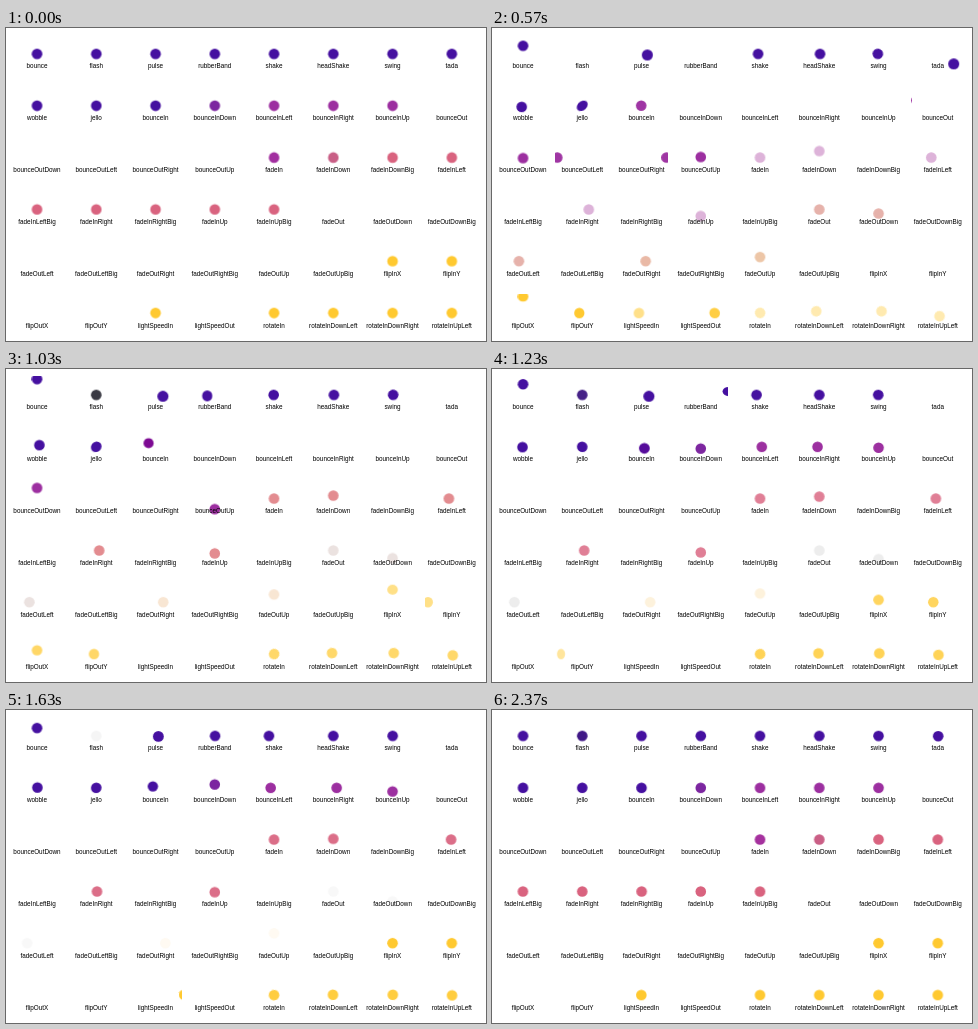
An HTML page that plays this animation: 480 px wide and 313 px high, repeating every 2.41 s.

```html
<!DOCTYPE html>
<html lang="en">
<head>
<meta charset="utf-8">
<title>Animation names</title>
<style>
html, body { margin: 0; width: 100%; height: 100%; overflow: hidden; background: #fff; }
svg { display: block; width: 480px; height: 313px; }
text { font: 12px Arial, "Liberation Sans", sans-serif; text-anchor: middle; fill: #000; }
circle { transform-box: view-box; transform-origin: 0 0; }
.live { animation: live 2410ms step-end infinite; }
.rest { animation: rest 2410ms step-end infinite; }
@keyframes live { 0% { opacity: 0 } 1.24% { opacity: 1 } 99.6%, to { opacity: 0 } }
@keyframes rest { 0% { opacity: 1 } 1.24% { opacity: 0 } 99.6%, to { opacity: 1 } }

/* attention */
@keyframes bounce {
  from, 20%, 53%, 80%, to { animation-timing-function: cubic-bezier(.215, .61, .355, 1); transform: translateY(0) }
  40%, 43% { animation-timing-function: cubic-bezier(.755, .05, .855, .06); transform: translateY(-30px) }
  70% { animation-timing-function: cubic-bezier(.755, .05, .855, .06); transform: translateY(-15px) }
  90% { transform: translateY(-4px) }
}
@keyframes flash { from, 50%, to { opacity: 1 } 25%, 75% { opacity: 0 } }
@keyframes pulse { from, to { transform: scale(1) } 50% { transform: scale(1.05) } }
@keyframes rubberBand {
  from, to { transform: scale(1, 1) }
  30% { transform: scale(1.25, .75) }
  40% { transform: scale(.75, 1.25) }
  50% { transform: scale(1.15, .85) }
  65% { transform: scale(.95, 1.05) }
  75% { transform: scale(1.05, .95) }
}
@keyframes shake {
  from, to { transform: translateX(0) }
  10%, 30%, 50%, 70%, 90% { transform: translateX(-10px) }
  20%, 40%, 60%, 80% { transform: translateX(10px) }
}
@keyframes headShake {
  0%, 50%, to { transform: translateX(0) rotateY(0deg) }
  6.5% { transform: translateX(-6px) rotateY(-9deg) }
  18.5% { transform: translateX(5px) rotateY(7deg) }
  31.5% { transform: translateX(-3px) rotateY(-5deg) }
  43.5% { transform: translateX(2px) rotateY(3deg) }
}
@keyframes swing {
  from, to { transform: rotate(0deg) }
  20% { transform: rotate(15deg) }
  40% { transform: rotate(-10deg) }
  60% { transform: rotate(5deg) }
  80% { transform: rotate(-5deg) }
}
@keyframes tada {
  from, to { transform: scale(1) rotate(0deg) }
  10%, 20% { transform: scale(.9) rotate(-3deg) }
  30%, 50%, 70%, 90% { transform: scale(1.1) rotate(3deg) }
  40%, 60%, 80% { transform: scale(1.1) rotate(-3deg) }
}
@keyframes wobble {
  from, to { transform: translateX(0) rotate(0deg) }
  15% { transform: translateX(-5px) rotate(-5deg) }
  30% { transform: translateX(4px) rotate(3deg) }
  45% { transform: translateX(-3px) rotate(-3deg) }
  60% { transform: translateX(2px) rotate(2deg) }
  75% { transform: translateX(-1px) rotate(-1deg) }
}
@keyframes jello {
  from, 11.1%, to { transform: skewX(0deg) skewY(0deg) }
  22.2% { transform: skewX(-12.5deg) skewY(-12.5deg) }
  33.3% { transform: skewX(6.25deg) skewY(6.25deg) }
  44.4% { transform: skewX(-3.125deg) skewY(-3.125deg) }
  55.5% { transform: skewX(1.5625deg) skewY(1.5625deg) }
  66.6% { transform: skewX(-.78deg) skewY(-.78deg) }
  77.7% { transform: skewX(.39deg) skewY(.39deg) }
  88.8% { transform: skewX(-.2deg) skewY(-.2deg) }
}

/* bouncing; --x and --y give the side */
@keyframes bounceIn {
  0% { opacity: 0; transform: scale(.3) }
  20% { transform: scale(1.1) }
  40% { transform: scale(.9) }
  60% { opacity: 1; transform: scale(1.03) }
  80% { transform: scale(.97) }
  to { opacity: 1; transform: scale(1) }
}
@keyframes bounceInFrom {
  0% { opacity: 0; transform: translate(calc(var(--x) * 3000px), calc(var(--y) * 3000px)) }
  60% { opacity: 1; transform: translate(calc(var(--x) * -25px), calc(var(--y) * var(--over, -25px))) }
  75% { transform: translate(calc(var(--x) * 10px), calc(var(--y) * 10px)) }
  90% { transform: translate(calc(var(--x) * -5px), calc(var(--y) * -5px)) }
  to { opacity: 1; transform: translate(0, 0) }
}
@keyframes bounceOut {
  0% { opacity: 1; transform: scale(1) }
  20% { transform: scale(.9) }
  50%, 55% { opacity: 1; transform: scale(1.1) }
  to { opacity: 0; transform: scale(.3) }
}
@keyframes bounceOutY {
  0% { opacity: 1; transform: translateY(0) }
  20% { transform: translateY(calc(var(--y) * 10px)) }
  40%, 45% { opacity: 1; transform: translateY(calc(var(--y) * -20px)) }
  to { opacity: 0; transform: translateY(calc(var(--y) * 2000px)) }
}
@keyframes bounceOutX {
  0% { opacity: 1; transform: translateX(0) }
  20% { opacity: 1; transform: translateX(calc(var(--x) * -20px)) }
  to { opacity: 0; transform: translateX(calc(var(--x) * 2000px)) }
}

/* fading */
@keyframes fadeIn {
  from { opacity: 0; transform: translate(calc(var(--x) * var(--far)), calc(var(--y) * var(--far))) }
  to { opacity: 1; transform: translate(0, 0) }
}
@keyframes fadeOut {
  from { opacity: 1; transform: translate(0, 0) }
  to { opacity: 0; transform: translate(calc(var(--x) * var(--far)), calc(var(--y) * var(--far))) }
}

/* flipping */
@keyframes flipInX {
  0% { animation-timing-function: ease-in; opacity: 0; transform: rotateX(90deg) }
  40% { animation-timing-function: ease-in; transform: rotateX(-20deg) }
  60% { opacity: 1; transform: rotateX(10deg) }
  80% { transform: rotateX(-5deg) }
  to { opacity: 1; transform: rotateX(0deg) }
}
@keyframes flipInY {
  0% { animation-timing-function: ease-in; opacity: 0; transform: rotateY(90deg) }
  40% { animation-timing-function: ease-in; transform: rotateY(-20deg) }
  60% { opacity: 1; transform: rotateY(10deg) }
  80% { transform: rotateY(-5deg) }
  to { opacity: 1; transform: rotateY(0deg) }
}
@keyframes flipOutX {
  from { opacity: 1; transform: rotateX(0deg) }
  30% { opacity: 1; transform: rotateX(-20deg) }
  to { opacity: 0; transform: rotateX(90deg) }
}
@keyframes flipOutY {
  from { opacity: 1; transform: rotateY(0deg) }
  30% { opacity: 1; transform: rotateY(-15deg) }
  to { opacity: 0; transform: rotateY(90deg) }
}

@keyframes lightSpeedIn {
  from { opacity: 0; transform: translateX(20px) skewX(-30deg) }
  60% { opacity: 1; transform: translateX(0) skewX(20deg) }
  80% { opacity: 1; transform: translateX(0) skewX(-5deg) }
  to { opacity: 1; transform: translateX(0) skewX(0deg) }
}
@keyframes lightSpeedOut {
  from { opacity: 1; transform: translateX(0) skewX(0deg) }
  to { opacity: 0; transform: translateX(20px) skewX(30deg) }
}
@keyframes rotateIn {
  from { opacity: 0; transform: rotate(var(--turn)) }
  to { opacity: 1; transform: rotate(0deg) }
}

/* tints while partly transparent */
@keyframes grey { 5%, 45%, 55%, 95% { fill: #30303a } 50% { fill: #4510a0 } }
@keyframes plum { 0%, 40% { fill: #86008c } 55% { fill: #4510a0 } }
@keyframes warm { 0%, 24% { fill: #a83a9c } 33%, 42% { fill: #d85f62 } 50%, 72% { fill: #d9637f } }
@keyframes pale { 33%, 38% { fill: #d79180 } 48%, to { fill: var(--end) } }
</style>
</head>
<body>
<svg viewBox="0 0 905.66 590.57">
  <defs id="defs"></defs>
  <g class="live" id="live"></g>
  <g class="rest" id="rest"></g>
  <g id="labels"></g>
</svg>
<script>
const names = `bounce flash pulse rubberBand shake headShake swing tada
wobble jello bounceIn bounceInDown bounceInLeft bounceInRight bounceInUp bounceOut
bounceOutDown bounceOutLeft bounceOutRight bounceOutUp fadeIn fadeInDown fadeInDownBig fadeInLeft
fadeInLeftBig fadeInRight fadeInRightBig fadeInUp fadeInUpBig fadeOut fadeOutDown fadeOutDownBig
fadeOutLeft fadeOutLeftBig fadeOutRight fadeOutRightBig fadeOutUp fadeOutUpBig flipInX flipInY
flipOutX flipOutY lightSpeedIn lightSpeedOut rotateIn rotateInDownLeft rotateInDownRight rotateInUpLeft`.split(/\s+/);

// first cell index of each colour
const ramp = [[0, '#4510a0'], [11, '#7c26a0'], [12, '#9c2fa0'], [20, '#a22fa0'], [21, '#c95f86'],
  [22, '#d9637f'], [29, '#d55a5a'], [33, '#ea813f'], [36, '#ffce40'], [37, '#ffc930']];
const colour = i => ramp.filter(([from]) => from <= i).pop()[1];

const outward = { Down: [0, 1], Up: [0, -1], Left: [-1, 0], Right: [1, 0] };
const eases = { headShake: 'ease-in-out', lightSpeedIn: 'ease-out', lightSpeedOut: 'ease-in' };
const origins = { swing: '50% 0', jello: '50% 50%', rotateIn: '50% 50%', rotateInDownLeft: '0 100%',
  rotateInDownRight: '100% 100%', rotateInUpLeft: '0 100%' };
const turns = { rotateIn: -200, rotateInDownLeft: -45, rotateInDownRight: 45, rotateInUpLeft: 45 };

function add(parent, tag, attrs) {
  const el = document.createElementNS('http://www.w3.org/2000/svg', tag);
  for (const k in attrs) el.setAttribute(k, attrs[k]);
  return parent.appendChild(el);
}

function motion(name, i) {
  let key = name, tint = '', css = '', ease = eases[name] || 'ease';
  const move = name.match(/^(bounce|fade)(In|Out)(Down|Up|Left|Right)?(Big)?$/);
  if (move) {
    const [, kind, way, side, big] = move;
    const sign = way === 'In' && (side === 'Down' || side === 'Up' || side === 'Left' || side === 'Right') ? flip(side) : 1;
    const [x, y] = (outward[side] || [0, 0]).map(v => v * sign);
    css = `--x:${x};--y:${y};--far:${big ? 2000 : 20}px;`;
    key = kind + way;
    if (kind === 'bounce') {
      if (way === 'In') ease = 'cubic-bezier(.215,.61,.355,1)';
      if (side) key += way === 'In' ? 'From' : x ? 'X' : 'Y';
      if (name === 'bounceInUp') css += '--over:-20px;';
    } else {
      tint = way === 'In' ? 'warm' : 'pale';
      css += `--end:${i < 33 ? '#999' : '#f5b540'};`;
    }
  }
  if (name in turns) {
    key = 'rotateIn';
    css += `--turn:${turns[name]}deg;`;
  }
  if (name in origins) css += `transform-box:fill-box;transform-origin:${origins[name]};`;
  if (name === 'flash') tint = 'grey';
  if (name === 'bounceIn') tint = 'plum';
  const run = (k, e) => `${k} 2410ms ${e} -8ms infinite`;
  return `${css}animation:${run(key, ease)}${tint ? ',' + run(tint, 'linear') : ''}`;
}

// vertical entrances start opposite to their heading, sideways ones on their own side
function flip(side) {
  return side === 'Down' || side === 'Up' ? -1 : 1;
}

const [defs, live, rest, labels] = ['defs', 'live', 'rest', 'labels'].map(id => document.getElementById(id));
names.forEach((name, i) => {
  const cx = 58.5 + 111.8 * (i % 8), cy = 49 + 97.75 * Math.floor(i / 8);
  const ball = { cx, cy, r: 10, fill: colour(i) };
  const clip = add(defs, 'clipPath', { id: 'c' + i });
  add(clip, 'rect', { x: cx - 49.6, y: cy - 35.1, width: 99.2, height: 70.2 });
  const cell = add(live, 'g', { 'clip-path': `url(#c${i})` });
  add(cell, 'circle', { ...ball, style: motion(name, i) });
  if (!name.includes('Out')) add(rest, 'circle', ball);
  add(labels, 'text', { x: cx, y: cy + 27.4 }).textContent = name;
});
</script>
</body>
</html>
```
